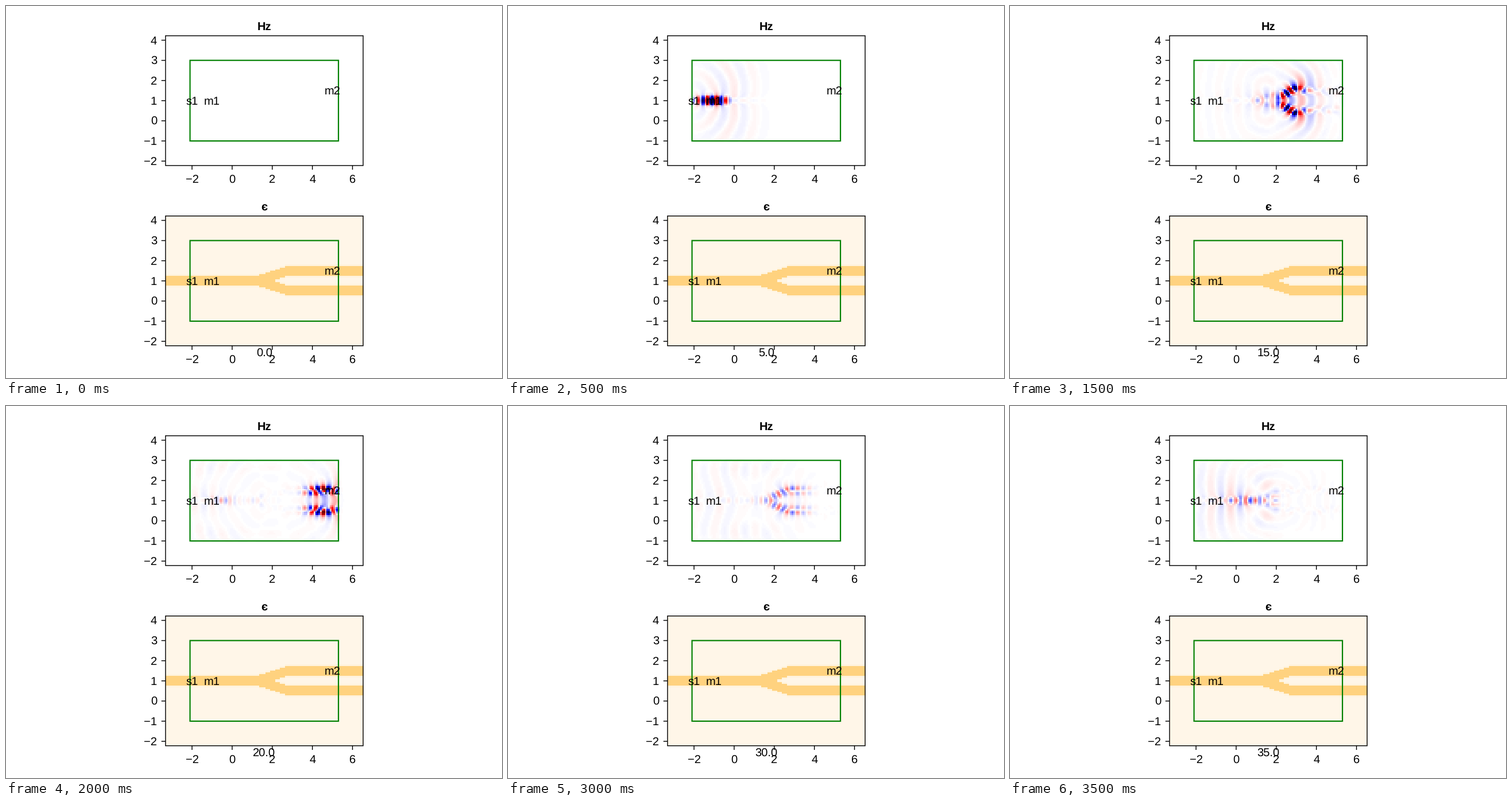
Recreate the animation shown at these times as a matplotlib script. Size 864 by 648 pixels, loop 4000 ms.

```python
import numpy as np
import matplotlib.pyplot as plt
from matplotlib.animation import FuncAnimation
from matplotlib.patches import Rectangle

W, H = 864, 648
UNIT = 1.44                      # layout unit in pixels
LEFT, RIGHT = 193 * UNIT, 432 * UNIT
HEIGHT = 157 * UNIT
TOP_HZ, TOP_EPS = 36 * UNIT, 254 * UNIT

X0, X1, Y0, Y1 = -3.32, 6.53, -2.22, 4.22
BOX = (-2.1, 5.3, -1, 3)
NX, NY, FINE = 123, 80, 2        # shown cells, solver cells per shown cell
FRAMES, STEP, DT = 8, 5.0, 0.025

plt.rcParams["font.family"] = "Liberation Sans"
plt.rcParams["text.hinting"] = "no_hinting"
fig = plt.figure(figsize=(W / 72, H / 72), dpi=72, facecolor="white")
ax = fig.add_axes([0, 0, 1, 1])
ax.axis("off")


# ---- Splitter ----

def centres(lo, hi, n):
    return lo + (hi - lo) * (np.arange(n) + 0.5) / n


def guide():
    """Share of each shown cell filled by the waveguide."""
    x, y = np.meshgrid(centres(X0, X1, NX), centres(Y0, Y1, NY))
    dy = (Y1 - Y0) / NY
    s = np.clip((x - 0.9) / 2.2, 0, 1)
    bend = np.round(0.25 * (1 - np.cos(np.pi * s)) / dy) * dy
    side = np.abs(y - 1)
    gap = np.where((side < bend) & (bend < 0.25), 0, np.abs(side - bend))
    return np.clip((0.25 - gap) / dy + 0.5, 0, 1)


# ---- Wave solver: Hz, Ex, Ey on a staggered grid ----

def average(a, axis):
    """Values on the edges between cells, outer edges included."""
    pad = [(1, 1) if k == axis else (0, 0) for k in range(2)]
    a = np.pad(a, pad, mode="edge")
    n = a.shape[axis]
    return 0.5 * (a.take(range(n - 1), axis) + a.take(range(1, n), axis))


def simulate(cover):
    """Complex Hz on the shown grid at every picture."""
    nx, ny = NX * FINE, NY * FINE
    dx, dy = (X1 - X0) / nx, (Y1 - Y0) / ny
    xs, ys = centres(X0, X1, nx), centres(Y0, Y1, ny)
    x, y = np.meshgrid(xs, ys)
    eps = 1 + 4.5 * np.kron(cover, np.ones((FINE, FINE)))

    # Lossy rim outside the box: soaks up free waves, half reflects guided ones
    inside = (x > BOX[0]) & (x < BOX[1]) & (y > BOX[2]) & (y < BOX[3])
    loss = np.where(inside, 0, 15.0) * DT / 2

    def factors(e, s):
        return (((e - s) / (e + s)).astype("f4"), (DT / (e + s)).astype("f4"))

    h_keep, h_gain = factors(1, loss)
    ex_keep, ex_gain = (f[1:-1] for f in factors(average(eps, 0), average(loss, 0)))
    ey_keep, ey_gain = (f[:, 1:-1] for f in factors(average(eps, 1), average(loss, 1)))

    hz = np.zeros((ny, nx), "c8")
    ex = np.zeros((ny + 1, nx), "c8")
    ey = np.zeros((ny, nx + 1), "c8")
    col = np.argmin(np.abs(xs + 2))
    mode = np.exp(-((ys - 1) / 0.2) ** 2)

    shots = []
    per_shot = round(STEP / DT)
    for n in range(per_shot * (FRAMES - 1) + 1):
        if n % per_shot == 0:
            shots.append(hz.reshape(NY, FINE, NX, FINE).mean(axis=(1, 3)))
        ex[1:-1] = ex_keep * ex[1:-1] + ex_gain * (np.diff(hz, axis=0) / dy)
        ey[:, 1:-1] = ey_keep * ey[:, 1:-1] - ey_gain * (np.diff(hz, axis=1) / dx)
        hz = h_keep * hz + h_gain * (np.diff(ex, axis=0) / dy - np.diff(ey, axis=1) / dx)
        t = n * DT
        hz[:, col] += mode * np.exp(-((t - 2.4) / 1.6) ** 2 - 2j * np.pi * t)
    return shots


def fields(cover):
    """Real fields, scaled so that a crest sits at x = 0.945 when t = 10."""
    shots = simulate(cover)
    col = np.argmin(np.abs(centres(X0, X1, NX) - 0.945))
    crest = shots[2][NY // 2, col]
    return [(1.8 * s / crest).real for s in shots]


# ---- Drawing ----

def px(x):
    return LEFT + (RIGHT - LEFT) * (x - X0) / (X1 - X0)


def py(y, top):
    return top + HEIGHT * (Y1 - y) / (Y1 - Y0)


def label(x, y, text, **kw):
    """Text whose digits are centred vertically on y."""
    kw = {"ha": "center", "fontsize": 14 * UNIT, "zorder": 5, **kw}
    return ax.text(x, y + 7, text, va="baseline", **kw)


def tick_label(x, y, v, **kw):
    label(x, y, str(v).replace("-", "\u2212"), **kw)


def line(xs, ys):
    ax.plot(xs, ys, color="black", lw=UNIT, zorder=4, snap=False,
            solid_capstyle="butt")


def outline(x0, x1, y0, y1, **kw):
    ax.add_patch(Rectangle((x0, y0), x1 - x0, y1 - y0, fill=False, snap=False, **kw))


def show(image, top, **kw):
    return ax.imshow(image, extent=(LEFT, RIGHT, top + HEIGHT, top), origin="lower",
                     aspect="auto", interpolation="nearest", zorder=1, **kw)


def panel(top, title):
    bottom = top + HEIGHT
    outline(LEFT, RIGHT, top, bottom, ec="black", lw=UNIT, zorder=4)
    outline(px(BOX[0]), px(BOX[1]), py(BOX[3], top), py(BOX[2], top),
            ec="green", lw=1.5 * UNIT, zorder=3)
    for v in range(-2, 7, 2):
        line([px(v)] * 2, [bottom, bottom + 5 * UNIT])
        tick_label(px(v), bottom + 23.5, v)
    for v in range(-2, 5):
        line([LEFT - 5 * UNIT, LEFT], [py(v, top)] * 2)
        tick_label(263, py(v, top), v, ha="right")
    label(450, top - 17, title, weight="bold")
    for name, x, y in (("s1", -2, 1), ("m1", -1, 1), ("m2", 5, 1.5)):
        label(px(x), py(y, top), name)


cover = guide()
hz_frames = fields(cover)

panel(TOP_HZ, "Hz")
panel(TOP_EPS, "\u0454")
tint = (0.09 + 0.41 * cover)[..., None]
show(1 - tint * (1 - np.array([1, 165 / 255, 0])), TOP_EPS)
# An odd number of colours keeps zero exactly white
hz = show(hz_frames[0], TOP_HZ, cmap=plt.get_cmap("seismic", 257), vmin=-1, vmax=1)
clock = label(450, 604, "0.0")
ax.set_xlim(0, W)
ax.set_ylim(H, 0)


def update(i):
    hz.set_data(hz_frames[i])
    clock.set_text(f"{i * STEP:.1f}")
    return hz, clock


anim = FuncAnimation(fig, update, frames=FRAMES, interval=500, repeat=True,
                     repeat_delay=0, blit=False)
plt.show()
```
